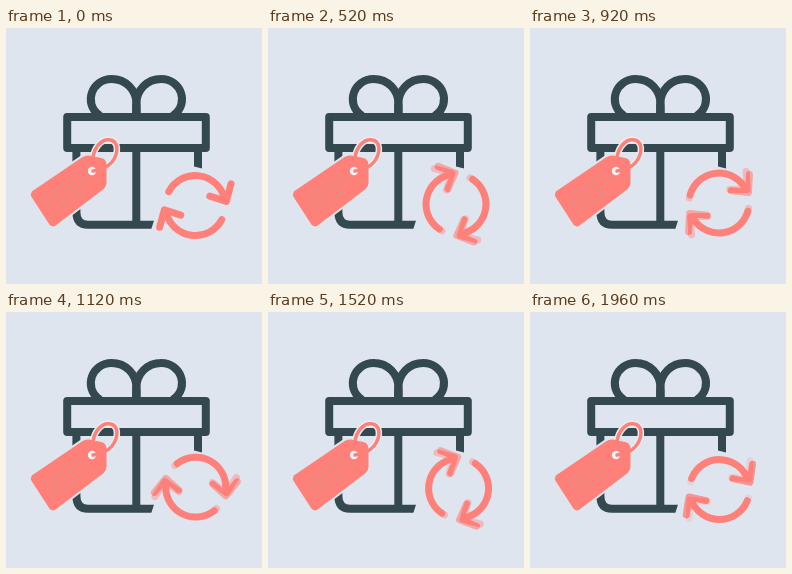
These frames come from a looping animation (256 by 256 pixels, 2000 ms). An HTML page:

```html
<!DOCTYPE html>
<html lang="en">
<head>
<meta charset="utf-8">
<title>Gift exchange</title>
<style>
  :root { --bg: #dfe5ee; --ink: #344850; --coral: #fe8079; --halo: #e8ecf2; }
  html, body { margin: 0; width: 100%; height: 100%; overflow: hidden; background: var(--bg); }
  svg { display: block; width: 100vw; height: 100vh; fill: none; stroke-linecap: round; stroke-linejoin: round; }
  .gift { stroke: var(--ink); stroke-width: 8; }
  .cut { fill: var(--bg); }
  .halo { stroke: var(--bg); stroke-width: 7; }
  .tag { fill: var(--coral); stroke: var(--coral); stroke-width: 3; }
  .print { stroke: #d98e86; stroke-width: 1.4; stroke-dasharray: 5 3 8 3; stroke-linecap: butt; }
  .string { stroke: var(--coral); stroke-width: 3.5; }
  .string.edge { stroke: var(--halo); stroke-width: 6.5; }
  .hole { fill: #f1f2f4; }
  .arrows { isolation: isolate; }
  .pose { stroke: var(--coral); stroke-width: 7; mix-blend-mode: plus-lighter; }
</style>
</head>
<body>
<svg viewBox="0 0 256 256">
  <defs>
    <g id="arrow">
      <path d="M-26.5 -14 A30 30 0 0 1 29.3 -6.5"/>
      <path d="M14.5 -9.5 L31 -4.2 L35.7 -21.7"/>
    </g>
    <g id="pair" transform="translate(0 1.3)">
      <use href="#arrow"/>
      <use href="#arrow" transform="rotate(180)"/>
    </g>
    <path id="bow" d="M93 87 C77 75 86 51 105.5 51 C120 51 130.4 62 130.4 76 V87"/>
    <path id="label" d="M27 164.5 Q25.8 166.5 27 168.5 L44.5 195.5 Q46.5 198 49 196 L96.5 160 Q99 158 99 155 L99 136 Q98.5 132.5 95 131.5 L83 129 Q80 128.5 77 130.5 Z"/>
    <path id="loop" d="M87 130 C88 119 96 111 103 111.7 C113 112.5 113 125 106 134 C101 140 95 142 87 143"/>
  </defs>

  <g class="gift">
    <use href="#bow"/>
    <use href="#bow" transform="matrix(-1 0 0 1 260.8 0)"/>
    <path d="M70.4 122 V184 Q70.4 196.7 82 196.7 H160"/>
    <path d="M130.3 87 V78 M130.3 120 V196 M192 122 V150"/>
  </g>
  <path class="cut" d="M148.5 191 L145 202 H202 V142 L186 138 L160 150 Z"/>
  <rect class="gift" x="61.2" y="89" width="138.6" height="31"/>

  <use href="#label" class="halo"/>
  <use href="#loop" class="string edge"/>
  <use href="#label" class="tag"/>
  <g class="print">
    <path d="M37 170 L76 143"/>
    <path d="M40 175 L80 147"/>
    <path d="M43 180 L82 152"/>
    <path d="M47 185 L78 162"/>
  </g>
  <circle class="hole" cx="86" cy="143" r="4.2"/>
  <use href="#loop" class="string"/>

  <!-- The ring sits slightly below its pivot, so it sways as it turns. -->
  <g class="arrows" transform="translate(189.3 176.3)">
    <use href="#pair" class="pose"/>
    <use href="#pair" class="pose"/>
  </g>
</svg>
<script>
  const LOOP = 2000, TICK = 40, POSES = 60;
  const poses = document.querySelectorAll('.pose');

  function setPose(el, index, weight) {
    el.setAttribute('transform', `rotate(${index * 360 / POSES})`);
    el.style.opacity = weight;
  }

  // Each tick mixes the two nearest of 60 evenly spaced poses.
  function draw(now) {
    const tick = Math.floor((now % LOOP) / TICK);
    const tenths = tick * TICK * POSES * 10 / LOOP;
    const index = Math.floor(tenths / 10);
    const mix = (tenths % 10) / 10;
    setPose(poses[0], index, 1 - mix);
    setPose(poses[1], index + 1, mix);
  }

  const start = performance.now();
  function frame() {
    draw(performance.now() - start);
    requestAnimationFrame(frame);
  }
  frame();
</script>
</body>
</html>
```
